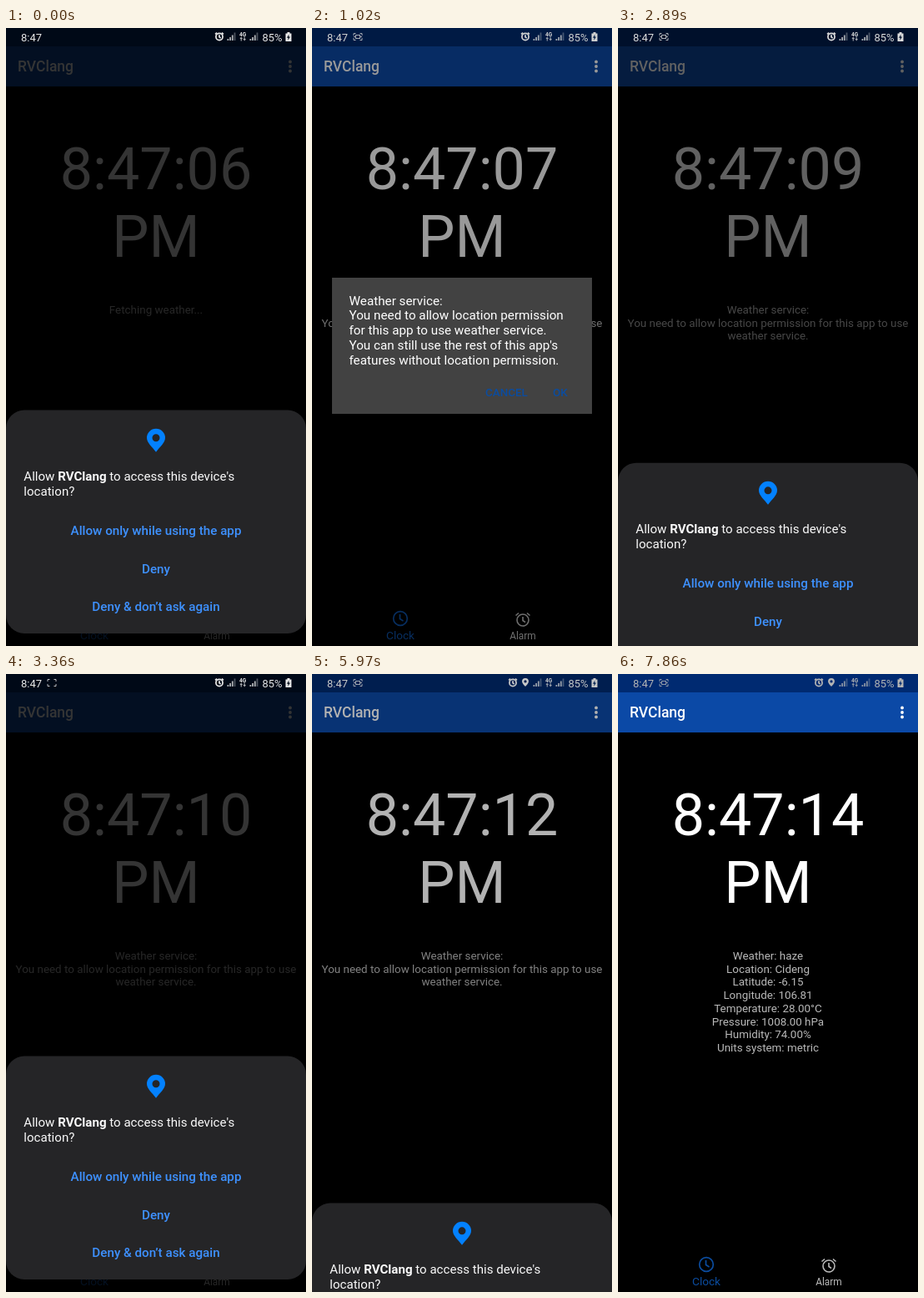
Write an HTML page that moves like this. It is 360 by 740 pixels and loops after 8000 ms.

```html
<!DOCTYPE html>
<html lang="en">
<head>
<meta charset="utf-8">
<style>
  html, body { margin: 0; width: 100%; height: 100%; overflow: hidden; background: #000; }
  svg { display: block; width: 360px; height: 740px; font-family: Roboto, sans-serif; }
  .mid { text-anchor: middle; }
  .line { fill: none; stroke: currentColor; }
  .medium { font-weight: 500; }
  #veil { mix-blend-mode: multiply; }
  #status { fill: currentColor; }
</style>
</head>
<body>
<svg viewBox="0 0 360 740">
  <defs>
    <g id="alarm" class="line">
      <circle r="7"/>
      <path d="M0-4V.5L3 2.5M-8.5-5.5L-5-8.5M8.5-5.5L5-8.5"/>
    </g>
    <path id="pin" d="M0 14C-4 8.500-11 3-11-3A11 11 0 0 1 11-3C11 3 4 8.500 0 14ZM0-7.500A4.500 4.500 0 1 0 0 1.500A4.500 4.500 0 1 0 0-7.500Z" fill-rule="evenodd"/>
    <g id="signal" opacity=".75">
      <path d="M0 9.500V7.500H1.800V9.500ZM2.700 9.500V5.500H4.500V9.500ZM5.400 9.500V3H7.200V9.500Z"/>
      <path d="M8.100 9.500V0H9.900V9.500Z" opacity=".45"/>
    </g>
  </defs>

  <g id="main">
    <rect width="360" height="740"/>
    <rect width="360" height="22" fill="#002a71"/>
    <rect y="22" width="360" height="48" fill="#0b49a6"/>
    <g fill="#fff">
      <text x="14" y="52" font-size="17.5" class="medium">RVClang</text>
      <circle cx="341" cy="40.500" r="1.900"/>
      <circle cx="341" cy="46" r="1.900"/>
      <circle cx="341" cy="51.500" r="1.900"/>
      <g class="mid" font-size="70">
        <text id="time" x="180" y="193"></text>
        <text x="180" y="274">PM</text>
      </g>
    </g>
    <g id="weather" class="mid" font-size="13.400" fill="#b9b9b9"></g>
    <g color="#0b4c9f">
      <g class="line" stroke-width="1.700">
        <circle cx="106" cy="707" r="8.300"/>
        <path d="M105.500 702V707.500L109.500 710"/>
      </g>
      <text class="mid" x="106" y="731.500" font-size="13.600" fill="currentColor">Clock</text>
    </g>
    <g color="#b9b9b9">
      <use href="#alarm" x="253" y="709" stroke-width="1.600"/>
      <text class="mid" x="253" y="731.500" font-size="11.900" fill="currentColor">Alarm</text>
    </g>
  </g>

  <rect id="veil" width="360" height="740"/>

  <g id="dialog">
    <rect x="24" y="299" width="312" height="163" fill="#424242"/>
    <g id="message" font-size="15.250" fill="#fff"></g>
    <g class="medium" font-size="13.400" fill="#0b4c9f">
      <text x="208" y="440.500">CANCEL</text>
      <text x="289" y="440.500">OK</text>
    </g>
    <clipPath id="button"><rect x="260" y="421" width="76" height="32"/></clipPath>
    <circle id="ripple" cx="298" cy="441" fill="#fff" opacity=".24" clip-path="url(#button)"/>
  </g>

  <g id="sheet">
    <rect y="457.500" width="360" height="267.500" rx="22" fill="#252527"/>
    <use href="#pin" x="180" y="493.700" fill="#0381fe"/>
    <g font-size="15.100" fill="#fafafa">
      <text x="21.300" y="542">Allow <tspan font-weight="700">RVClang</tspan> to access this device's</text>
      <text x="21.300" y="560">location?</text>
    </g>
    <g class="mid medium" font-size="15.200" fill="#3e91ff">
      <text x="180" y="607">Allow only while using the app</text>
      <text x="180" y="652.500">Deny</text>
      <text x="180" y="698">Deny &amp; don’t ask again</text>
    </g>
  </g>

  <g id="status">
    <text x="18" y="15.500" font-size="13">8:47</text>
    <g id="capture" class="line" opacity=".8">
      <path d="M50 9V6.500H52.500M57.500 6.500H60V9M60 12V14.500H57.500M52.500 14.500H50V12"/>
      <g id="lens"><rect x="52.500" y="8.500" width="5" height="4"/><path d="M50 10.500H52.500M57.500 10.500H60"/></g>
    </g>
    <use id="bell" href="#alarm" stroke-width="3"/>
    <use id="place" href="#pin" transform="translate(256 10) scale(.36)"/>
    <use href="#signal" x="265.500" y="5.500"/>
    <text class="mid" x="284" y="9.500" font-size="6.500" font-weight="700">4G</text>
    <path d="M280.500 13L282.200 10.500L284 13H282.800V15.500H281.700V13ZM284.500 13H285.600V10.500H286.700V13H288L286.200 15.500Z" opacity=".75"/>
    <use href="#signal" x="292.500" y="5.500"/>
    <text x="307.500" y="15.500" font-size="12.900">85%</text>
    <path d="M337.500 5H340.500V6.500H342.500V16H335.500V6.500H337.500ZM339.500 7.500L337 11.800H338.700L338.200 15L341 10.500H339.300Z" fill-rule="evenodd"/>
  </g>
</svg>

<script>
const LOOP = 8000;
const TICKS = [390, 1480, 2130, 3340, 4380, 5385, 6390, 7380];
const BLINKS = [880, 1480, 2100, 2340, 2850, 3340, 3880, 4380, 4860, 5385, 5830, 6390, 6890, 7380, 7860];
const DIALOG_DIM = 108, SHEET_DIM = 52;

const $ = id => document.getElementById(id);
const ramp = (t, from, to) => Math.min(1, Math.max(0, (t - from) / (to - from)));
const easeOut = p => 1 - (1 - p) ** 3;
const smooth = p => p * p * (3 - 2 * p);
const passed = (times, t) => times.filter(x => x <= t).length;
const mix = (a, b, p) => a + (b - a) * p;
const grey = v => `rgb(${v}, ${v}, ${v})`;
const show = (el, on) => el.style.display = on ? '' : 'none';
const lines = (rows, x, y, step) =>
  rows.map((s, i) => `<text x="${x}" y="${y + i * step}">${s}</text>`).join('');

const reports = [
  ['Fetching weather...'],
  ['Weather service:', 'You need to allow location permission for this app to use', 'weather service.'],
  ['Weather: haze', 'Location: Cideng', 'Latitude: -6.15', 'Longitude: 106.81', 'Temperature: 28.00°C',
    'Pressure: 1008.00 hPa', 'Humidity: 74.00%', 'Units system: metric']
];
$('weather').innerHTML = reports.map(r => `<g>${lines(r, 180, 342, 15.71)}</g>`).join('');
$('message').innerHTML = lines(['Weather service:', 'You need to allow location permission',
  'for this app to use weather service.', "You can still use the rest of this app's",
  'features without location permission.'], 44.5, 331.5, 17.9);

function draw(t) {
  const seconds = 6 + passed(TICKS, t);
  $('time').textContent = '8:47:' + String(seconds).padStart(2, '0');
  const report = passed([440, 7020], t);
  [...$('weather').children].forEach((el, i) => show(el, i === report));

  // how far the permission sheet is up
  const up = t < 2000 ? 1 - smooth(ramp(t, 40, 420))
    : t < 5000 ? easeOut(ramp(t, 2690, 3200))
    : 1 - smooth(ramp(t, 5820, 6080));
  show($('sheet'), up > 0);
  $('sheet').setAttribute('transform', `translate(0 ${(1 - up) * 284})`);

  const dialogDim = ramp(t, 800, 1120) - ramp(t, 2520, 2720);
  const dialog = ramp(t, 800, 920) - ramp(t, 2480, 2660);
  show($('dialog'), dialog > 0);
  $('dialog').setAttribute('opacity', dialog);
  $('ripple').setAttribute('r', 20 * easeOut(ramp(t, 2330, 2500)));
  $('veil').setAttribute('fill', grey(mix(mix(255, DIALOG_DIM, dialogDim), SHEET_DIM, up)));

  const located = t >= 5920;
  $('status').style.color = grey(mix(180, 232, Math.max(up, dialogDim * .8)));
  show($('capture'), t >= 390);
  show($('lens'), passed(BLINKS, t) % 2);
  show($('place'), located);
  $('bell').setAttribute('transform', `translate(${located ? 241 : 256} 10.5) scale(.58)`);
}

function frame() {
  draw(performance.now() % LOOP);
  requestAnimationFrame(frame);
}
frame();
</script>
</body>
</html>
```
